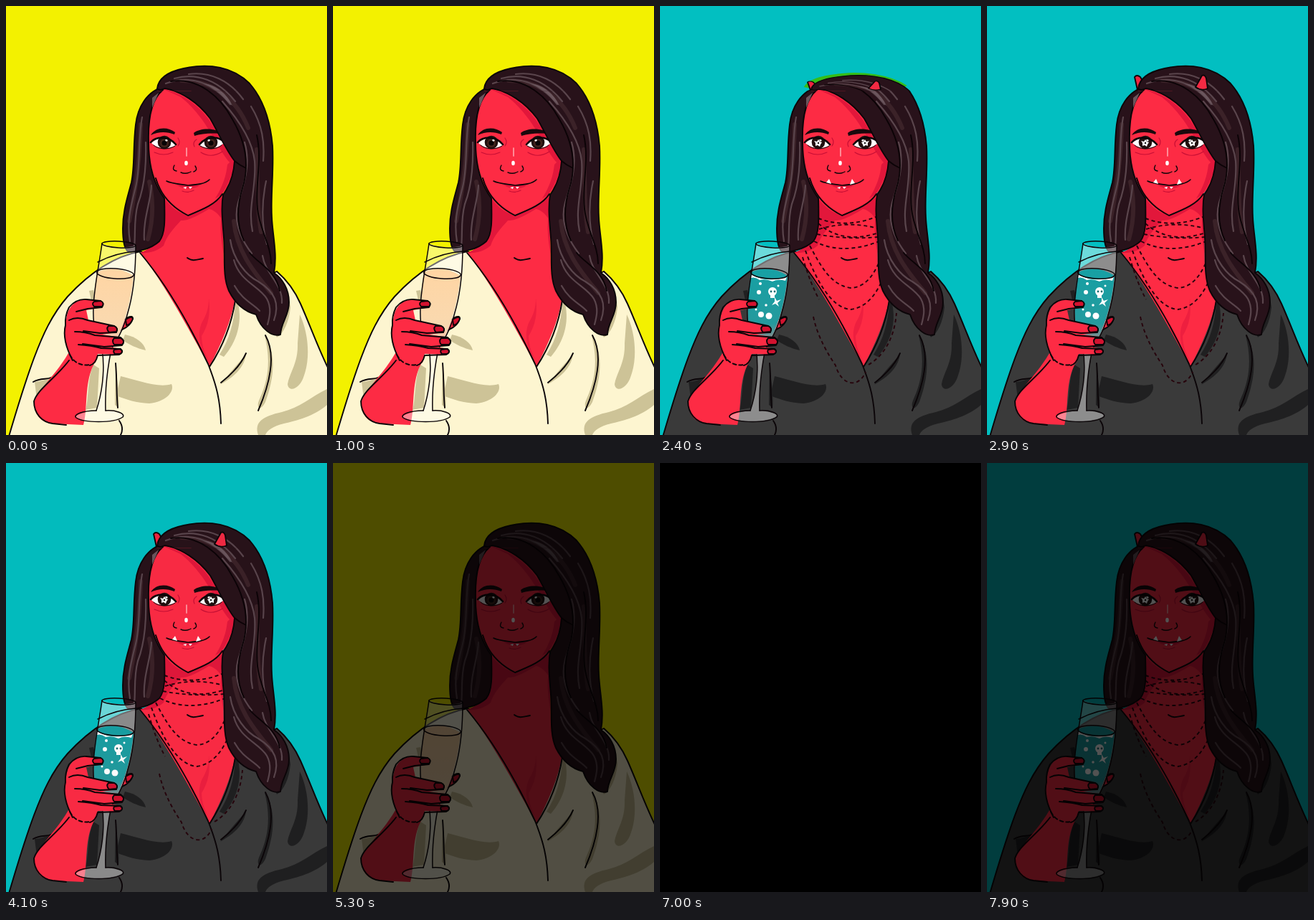
An HTML page that plays this animation: 448 by 598 pixels, repeating every 8 s.

```html
<!DOCTYPE html>
<html lang="en">
<head>
<meta charset="utf-8">
<title>Portrait with a glass</title>
<style>
html,body{margin:0;width:100%;height:100%;overflow:hidden;background:#000}
svg{display:block;width:100vw;height:100vh}
.ink{fill:none;stroke:#0b0508;stroke-width:1.9;stroke-linecap:round;stroke-linejoin:round}
.robe{fill:var(--robe)}
.shade{fill:var(--shade);stroke:none}
.skin{fill:#fd2b44}
.dim{fill:#e2173b;stroke:none}
.hair{fill:#28121a}
.shine{fill:none;stroke:#5a454c;stroke-width:2.2;stroke-linecap:round}
.lock{fill:none;stroke:#3b2228;stroke-width:6;stroke-linecap:round}
.soft{fill:none;stroke:#c80f35;stroke-width:1.2;stroke-linecap:round}
.glass{fill:#fff;fill-opacity:.42}
.nail{fill:#d3122f}
.white{fill:#fff;stroke:none}
.day{opacity:var(--day)}
.night{opacity:var(--night)}
.chain{fill:none;stroke:#26040c;stroke-width:1.9;stroke-dasharray:5 4}
</style>
</head>
<body>
<svg viewBox="0 0 448 598" preserveAspectRatio="none">
<defs>
  <linearGradient id="wine" x1="0" y1="0" x2="0" y2="1">
    <stop stop-color="#ffd5a3"/><stop offset=".75" stop-color="#f9d9b0"/><stop offset="1" stop-color="#f8aaa0"/>
  </linearGradient>
  <linearGradient id="potion" x1="0" y1="0" x2="0" y2="1">
    <stop stop-color="#16a0a4"/><stop offset=".7" stop-color="#259a9d"/><stop offset="1" stop-color="#c98687"/>
  </linearGradient>
  <clipPath id="below"><rect y="118" width="448" height="480"/></clipPath>
  <clipPath id="above"><rect width="448" height="118.3"/></clipPath>
  <path id="liquid" d="M127 371Q153 360 178 376C174 420 160 459 147 476H134L127 460C120 436 122 400 127 371Z"/>

  <g id="figure">
    <!-- robe -->
    <path class="ink robe" d="M4 600C14 566 26 526 39 491C51 459 64 430 86 405C112 377 145 350 188 342L315 400L378 370C392 382 403 397 411 415C424 444 434 473 450 506V600Z"/>
    <g class="shade">
      <path d="M160 516C182 521 212 533 231 527C236 538 222 552 200 554C182 553 168 549 154 543Z"/>
      <path d="M166 458C182 461 193 470 195 480C182 477 172 472 163 466Z"/>
      <path d="M410 430C422 455 425 490 416 515C410 535 394 539 393 527C396 510 408 498 407 470Z"/>
      <path d="M361 459C374 478 378 508 362 552C355 566 349 560 353 550C366 522 370 495 361 459Z"/>
      <path d="M324 415C330 442 322 468 304 489L298 486C312 464 318 442 320 414Z"/>
      <path d="M335 486C331 508 315 518 299 528C311 513 322 500 335 486Z"/>
      <path d="M352 598C346 580 358 572 385 566C410 560 425 545 448 534V556C430 572 405 578 388 582C372 586 364 592 362 598Z"/>
      <path d="M122 396L116 397L119 410H126Z"/>
      <path d="M122 500C113 520 116 545 111 563L127 560L130 505Z"/>
      <path d="M153 498C154 520 159 540 157 560L152 556Z"/>
      <path d="M40 524C54 523 60 518 66 515L56 533L43 548Z"/>
      <path d="M375 455C385 449 390 425 394 400L397 420C395 440 388 456 378 462Z"/>
    </g>
    <path class="ink" d="M362 459C376 484 371 520 352 564M38 524C48 518 56 521 63 518M153 498C155 522 154 544 156 560M158 578Q165 588 160 598M335 484C328 500 314 514 300 525"/>

    <!-- neck and chest -->
    <path class="skin" d="M222 265L221 300C219 322 207 337 187 344C216 380 247 435 284 503C301 470 314 440 320 408L304 370L303 262Z"/>
    <path class="dim" d="M221 268C230 281 242 289 254 292L303 266V300C296 289 290 284 283 283C268 292 256 299 244 299C234 310 224 321 220 334C211 342 199 345 188 344C208 335 219 324 221 300Z"/>
    <path class="dim" d="M301 290C296 322 306 360 319 408C307 392 303 376 304 350Z"/>
    <path class="dim" d="M283 408C286 428 282 446 273 460C274 478 278 484 282 492C270 478 266 456 274 440C280 430 283 420 283 408Z" opacity=".55"/>
    <path class="ink" d="M253 351C261 357 267 353 275 352"/>
    <path class="ink" d="M187 344C224 388 257 446 282 499C294 529 299 550 300 582M284 503C303 474 315 443 320 410"/>

    <g class="night chain">
      <path d="M221 296Q260 311 304 293M222 311Q262 299 304 310M221 303Q255 333 305 316"/>
      <path d="M219 318Q260 326 304 322M215 328Q255 348 306 328"/>
      <path d="M209 334C224 362 238 389 266 393C289 392 300 371 307 354"/>
      <path d="M203 341C216 378 238 421 266 423C289 420 302 401 310 382"/>
      <path d="M199 350C207 377 213 392 222 409M214 433C220 462 235 486 245 501C253 529 277 534 287 510"/>
      <path d="M291 500C310 489 327 466 330 428"/>
    </g>

    <!-- face -->
    <path class="skin" d="M216 112C202 128 197 158 198 190C200 224 209 252 222 268C232 280 244 287 254 292C274 284 292 277 301 263C313 250 322 232 322 212L300 150L250 112Z"/>
    <path class="dim" d="M220 116C252 123 277 145 291 171C303 195 312 208 322 216L313 219C293 197 282 157 244 127Z"/>
    <path class="dim" d="M300 264C310 249 320 228 320 210L309 221C307 239 302 252 292 268Z"/>
    <path class="ink" d="M209 240C216 264 232 281 254 292C276 283 293 276 302 262"/>

    <!-- features -->
    <g fill="#1a090d">
      <path d="M202 180C209 168 226 168 236 176L235 179C224 175 213 175 202 180Z"/>
      <path d="M262 177C271 170 292 169 304 179C289 176 274 178 263 181Z"/>
    </g>
    <path class="soft" d="M207 204Q220 210 233 204M272 204Q286 213 302 203M240 184Q244 190 240 195M266 186Q260 190 263 196"/>
    <g id="eye">
      <path class="white" d="M203 191C210 182 228 181 237 194C228 200 212 200 203 191Z"/>
      <circle cx="221" cy="190" r="9.3" fill="#21100f"/>
      <circle cx="221" cy="191" r="6" fill="#42241d" class="day"/>
      <circle cx="221" cy="191" r="3.6" fill="#080405"/>
      <circle cx="224" cy="187" r="1.7" fill="#fff"/>
      <g class="night white"><path d="M221 186L223 189L226 190L224 193L223 196L220 194L217 195L217 191L215 188L219 189Z"/><circle cx="221" cy="191" r="1.2" fill="#111"/></g>
      <path class="ink" style="stroke-width:2.6" d="M202 190C209 182 226 180 237 193"/>
      <path class="ink" style="stroke-width:1" d="M206 194C212 200 227 201 236 195"/>
    </g>
    <use href="#eye" transform="translate(507) scale(-1 1)"/>
    <path d="M252 198V209" stroke="#ff9da6" stroke-width="1.7" stroke-linecap="round"/>
    <ellipse class="white" cx="251.500" cy="219" rx="2.300" ry="3.300"/>
    <path class="ink" style="stroke-width:1.4" d="M235 222Q231 229 238 230M244 232Q251 235 258 231M264 223Q268 229 262 231"/>
    <path class="dim" d="M238 249Q246 248 254 250Q264 248 272 248C266 256 248 257 238 249Z"/>
    <path class="ink" style="stroke-width:1.6" d="M224 244C232 248 242 248 254 250C267 249 278 248 284 242"/>
    <path class="white" d="M247 253L252 252L251 255ZM255 252L260 252L257 255Z"/>
    <path class="soft" d="M246 258Q254 261 262 257"/>
    <path class="night white" d="M232 246L236 241L239 248ZM265 249L268 241L272 247Z"/>

    <!-- hair -->
    <path id="halo" d="M207 112C211 99 225 91 248 87C282 79 319 89 340 111" fill="none" stroke="#35bd18" stroke-width="13"/>
    <path class="night ink" style="fill:#ef2440" d="M206 99Q209 95 214 99L219 108L210 117Z"/>
    <path class="ink hair" d="M218 113C197 120 184 140 181 165C177 197 180 222 175 246C169 269 163 286 163 310C163 326 165 338 170 342C181 344 202 339 214 328C222 318 222 300 221 268C207 249 199 222 199 190C198 155 203 130 219 117Z"/>
    <path class="ink hair" d="M211 115C213 99 229 91 248 87C284 79 317 85 340 108C359 130 369 160 372 195C374 230 369 266 371 295C372 319 379 346 374 372C386 380 395 395 395 413C395 432 384 440 383 458C372 462 356 451 349 430C333 426 320 415 311 397C302 377 306 350 304 323C302 298 300 281 303 263C314 248 318 232 319 216C306 199 296 176 285 157C268 134 244 119 222 115C218 116 215 119 211 115Z"/>
    <path class="lock" d="M188 165C187 215 180 262 172 300M200 245C207 275 205 300 198 325M245 104C290 104 322 130 338 170M350 200C352 250 350 280 356 315M318 300C322 345 350 375 370 400"/>
    <g class="shine">
      <path d="M190 155C184 186 188 225 181 252C175 277 168 299 173 328M195 190C196 221 194 250 184 276C178 298 181 319 179 335M203 250C202 273 191 298 193 326"/>
      <path d="M223 108C256 96 287 105 313 137M235 101C266 92 297 104 320 133M255 95C285 91 312 104 331 130"/>
      <path d="M302 133C325 159 344 187 347 216C350 252 337 280 344 314M342 140C358 166 361 190 359 216M333 190C342 220 332 249 324 274C317 299 327 324 343 345M363 244C356 277 357 306 364 332"/>
      <path d="M313 326C317 354 336 376 352 384C376 399 382 415 374 438M318 354C326 384 353 390 364 408C371 421 368 433 365 444M358 348C362 374 387 388 385 414M319 390C330 410 345 415 354 425"/>
    </g>
    <path d="M276 108C292 110 308 121 316 139L308 132C299 120 288 114 276 108ZM204 128L213 121L204 142Z" fill="#6b565d"/>
    <path class="ink" style="stroke:#0b0306" d="M230 105C268 99 299 126 316 158C333 187 341 219 330 254C322 280 321 304 332 327M350 180C358 215 347 251 351 283C354 312 370 333 370 359M340 344C352 359 377 369 382 397M319 216Q326 222 335 226"/>
    <path class="night ink" style="fill:#f32a43" d="M300 97Q304 95 306 101L308 115Q299 119 291 113Z"/>

    <!-- forearm and thumb -->
    <path class="skin" d="M87 484C70 514 44 535 39 553C40 571 49 580 64 582L108 584C115 559 108 520 126 494Z"/>
    <path class="ink" d="M88 494C70 518 44 534 39 551C39 568 50 580 65 582L84 584"/>
    <path class="ink skin" d="M154 444L170 434Q177 431 177 436Q174 446 162 451L151 457Z"/>
    <path class="ink nail" d="M167 437Q176 431 177 436Q174 444 168 445Z"/>

    <!-- flute -->
    <path class="glass" d="M134 331C130 361 123 391 122 420C121 445 126 465 134 478C139 510 133 543 126 564Q100 567 97 573Q110 580 133 579Q160 577 164 570Q154 565 139 564C138 535 141 508 147 478C159 462 171 432 177 392Q181 361 181 334Q157 340 134 331Z"/>
    <use href="#liquid" class="day" fill="url(#wine)"/>
    <g class="night">
      <use href="#liquid" fill="url(#potion)"/>
      <g class="white">
        <path d="M127 374Q150 387 177 377L175 383Q164 380 157 384Q148 380 139 382Q133 377 127 379Z"/>
        <circle cx="157" cy="398" r="6"/><rect x="154" y="402" width="6" height="5"/>
        <circle cx="138" cy="399" r="3"/><circle cx="141" cy="430" r="4"/><circle cx="152" cy="432" r="4.500"/><circle cx="134" cy="423" r="1.500"/><circle cx="148" cy="417" r="1.800"/><circle cx="140" cy="387" r="2"/><circle cx="165" cy="390" r="1.500"/>
        <path d="M160 406L163 411L169 409L164 414L166 419L161 415L156 417L160 412Z"/>
      </g>
      <circle cx="155" cy="398" r="1.400" fill="#176c70"/><circle cx="160" cy="398" r="1.400" fill="#176c70"/>
    </g>
    <g class="ink" style="stroke-width:1.5">
      <ellipse cx="157.500" cy="332.500" rx="23.500" ry="4.500" transform="rotate(3 157 332)"/>
      <ellipse cx="152.500" cy="373" rx="25.800" ry="7" transform="rotate(4 152 373)"/>
      <path d="M134 331C130 361 123 391 122 420C121 445 126 465 134 478C139 510 133 543 126 564M181 334C181 361 179 393 172 420C166 446 157 464 147 478C141 508 138 535 139 564"/>
      <path d="M126 564C106 564 93 570 98 574C108 581 150 582 163 573C167 568 153 563 139 564"/>
      <path d="M128 357Q153 344 181 342"/>
    </g>

    <!-- fingers -->
    <path class="skin" d="M85 432C88 418 98 409 112 409L132 411Q138 414 134 420L112 424L115 438L151 446Q157 449 154 455L134 458L160 462Q167 467 162 473L145 475L160 478Q165 482 158 486L128 485L125 497C115 504 100 503 93 493C84 477 79 461 82 446Z"/>
    <g class="ink">
      <path d="M93 494C84 477 79 461 83 445Q82 432 88 420Q98 408 112 409L132 411Q138 414 134 420L114 422L98 426M88 438Q99 432 114 438L151 446Q157 449 154 455L131 456L108 453M96 454Q111 454 124 459L160 462Q167 467 162 473L137 475L107 471M101 472Q119 473 133 477L160 478Q165 482 158 486L128 487Q125 499 117 501"/>
      <path style="stroke-dasharray:5 4" d="M89 486Q98 503 117 500"/>
      <g class="nail">
        <path d="M123 412L132 411Q138 414 134 419L123 419Q119 415 123 412Z"/>
        <path d="M143 446L151 446Q157 449 154 454L144 455Q139 450 143 446Z"/>
        <path d="M151 463L160 463Q167 467 162 472L151 472Q147 467 151 463Z"/>
        <path d="M151 479L159 478Q165 482 159 485L152 485Q149 482 151 479Z"/>
      </g>
    </g>
  </g>
</defs>
<rect id="backdrop" width="448" height="598"/>
<g clip-path="url(#below)"><use href="#figure"/></g>
<g id="crown"><g clip-path="url(#above)"><use href="#figure"/></g></g>
<rect id="dark" width="448" height="598"/>
</svg>
<script>
const LOOP = 8000, STEP = 100, SEAM = 118;
const $ = id => document.getElementById(id);
const root = document.documentElement.style;

// Piecewise linear track of [time, value] stops.
function track(stops, t) {
  let [t0, v0] = stops[0];
  for (const [t1, v1] of stops) {
    if (t < t1) return t1 === t0 ? v1 : v0 + (v1 - v0) * (t - t0) / (t1 - t0);
    [t0, v0] = [t1, v1];
  }
  return v0;
}

const mix = (a, b, k) => `rgb(${a.map((v, i) => Math.round(v + (b[i] - v) * k))})`;

const YELLOW = [243, 241, 0], GREEN = [60, 195, 30], TEAL = [2, 191, 193];
const backdrop = k => k < .5 ? mix(YELLOW, GREEN, k * 2) : mix(GREEN, TEAL, k * 2 - 1);

const CHANGE = [[1100, 0], [2300, 1]];
const CROWN = [[2100, 1], [2400, .62], [2800, 1]];
const LIGHT = [[4000, 1], [4100, .98], [4400, 0], [5200, 0], [5500, .97], [5600, 1],
               [6600, 1], [6700, .98], [7000, 0], [7800, 0], [7900, .32]];

function draw(t) {
  const night = t < 4800 ? track(CHANGE, t) : t < 7400 ? 0 : 1;
  const crown = track(CROWN, t);
  root.setProperty('--night', night);
  root.setProperty('--day', 1 - night);
  root.setProperty('--robe', mix([253, 245, 208], [58, 58, 58], night));
  root.setProperty('--shade', mix([205, 195, 151], [32, 32, 33], night));
  $('backdrop').setAttribute('fill', backdrop(night));
  $('crown').setAttribute('transform', `translate(0 ${SEAM * (1 - crown)}) scale(1 ${crown})`);
  $('halo').setAttribute('opacity', Math.min(1, (1 - crown) / .3));
  $('dark').setAttribute('opacity', 1 - track(LIGHT, t));
}

const start = performance.now();
function tick() {
  const t = (performance.now() - start) % LOOP;
  draw(Math.floor(t / STEP) * STEP);
  requestAnimationFrame(tick);
}
tick();
</script>
</body>
</html>
```
